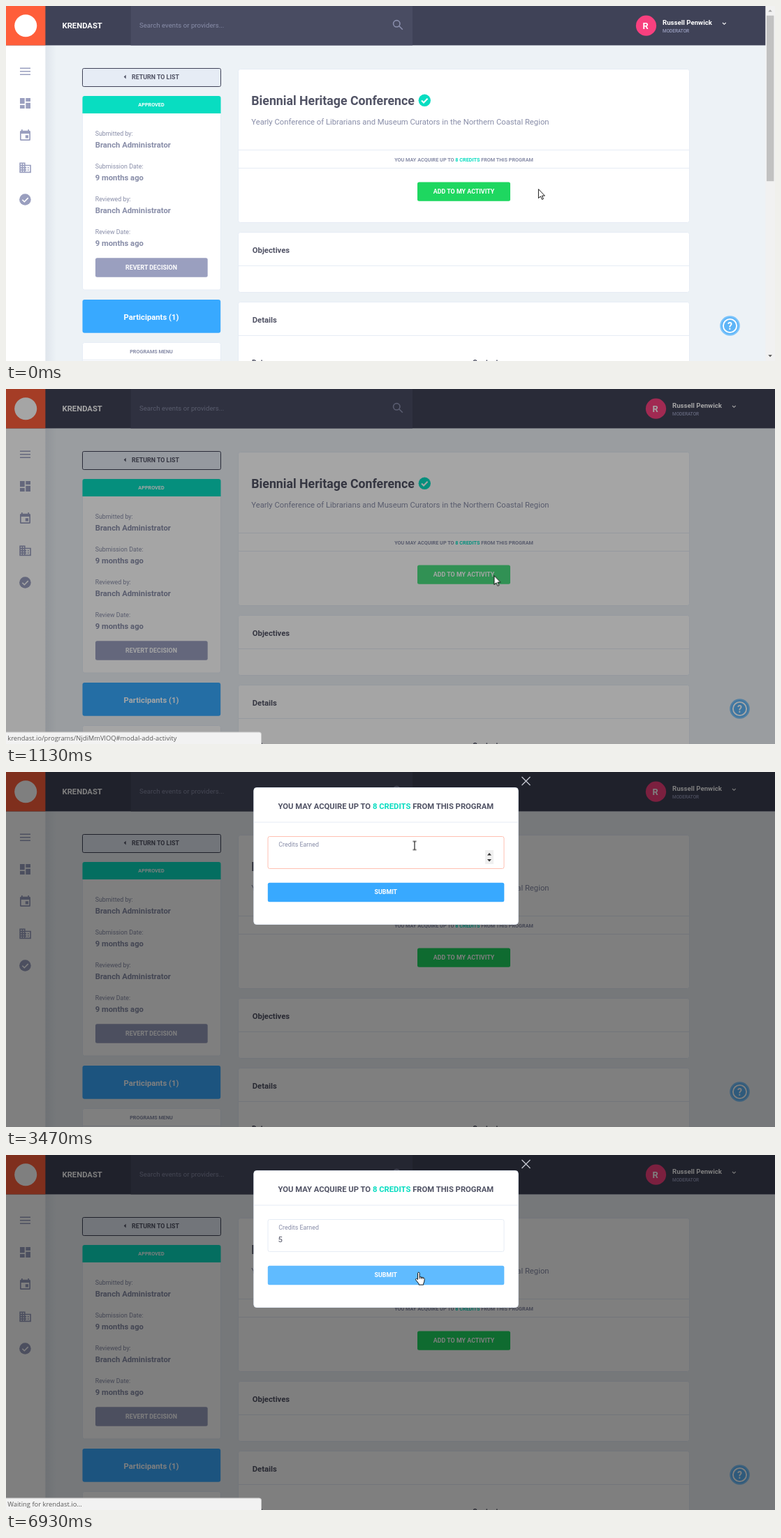
An HTML page for the animation above (8000 ms loop, 1101 by 509 pixels).

```html
<!DOCTYPE html>
<html lang="en">
<head>
<meta charset="utf-8">
<title>Add to my activity</title>
<style>
html, body { margin: 0; width: 100%; height: 100%; overflow: hidden; background: #edf2f6; }
svg { display: block; }
text { font-family: Roboto, Arial, sans-serif; font-size: 11.28px; fill: #888da8; }
.b { font-weight: 700; }
.m { font-size: 9.67px; }
.s { font-size: 8.87px; }
.xs { font-size: 7.25px; }
.mid { text-anchor: middle; }
.dark { fill: #515365; }
.white { fill: #fff; }
.teal { fill: #08ddc1; }
.card { fill: #fff; stroke: #e6ecf5; }
.rule { stroke: #e6ecf5; fill: none; }
.icon { fill: #9a9fbf; }
.line { stroke: #9a9fbf; fill: none; }
.tip text { font-family: "Open Sans", "Noto Sans", sans-serif; font-size: 9.4px; fill: #5a5a5a; }

/* one percent of the loop is 80 ms */
.anim { animation: 8s linear infinite; }
.step { animation: 8s step-end infinite; }
#bar { animation-name: bar; }
.edge { animation-name: edge; }
#add { animation-name: add; }
#shade { animation-name: shade; }
#modal { animation-name: slide, appear; animation-duration: 8s; animation-iteration-count: infinite; animation-timing-function: linear; }
#link { animation-name: link; }
#wait { animation-name: wait; }
#box { animation-name: box; }
#spin { animation-name: spin; }
#label { animation-name: label; }
#value { animation-name: value; }
#caret { animation-name: blink; }
#submit { animation-name: submit; }
#cursor { animation-name: move; }
#arrow { animation-name: arrow; }
#beam { animation-name: beam; }
#hand { animation-name: hand; }

@keyframes bar { 0% { opacity: 1 } 12.8125%, 100% { opacity: 0 } }
@keyframes edge { 0% { transform: translateX(0) } 12.8125%, 100% { transform: translateX(14px) } }
@keyframes add {
  0%, 4.125% { fill: #1ed760 } 7.875%, 14.6875% { fill: #4be082 }
  18.4375%, 100% { fill: #1ed760 }
}
@keyframes shade { 0%, 12.8125% { opacity: 0 } 14.6875%, 100% { opacity: .5 } }
@keyframes slide {
  0%, 14.6875% { transform: translateY(-49px); animation-timing-function: ease-out }
  18.4375%, 100% { transform: translateY(0) }
}
@keyframes appear { 0%, 14.6875% { opacity: 0 } 16.5625%, 100% { opacity: 1 } }
@keyframes link {
  0%, 4.625% { opacity: 0 } 5.5%, 16.25% { opacity: 1 } 19.125%, 100% { opacity: 0 }
}
@keyframes wait { 0% { opacity: 0 } 85.875%, 100% { opacity: 1 } }
@keyframes box {
  0%, 36.75% { stroke: #e6ecf5 } 39%, 85.875% { stroke: #ffc0b2 } 86.6%, 100% { stroke: #e6ecf5 }
}
@keyframes spin { 0% { opacity: 0 } 34.25% { opacity: 1 } 85.875%, 100% { opacity: 0 } }
@keyframes label {
  0%, 36.75% { transform: translate(390.3px, 117px); animation-timing-function: ease }
  40.5%, 100% { transform: translate(390.3px, 107.3px) scale(.786) }
}
@keyframes value { 0% { opacity: 0 } 54.125%, 100% { opacity: 1 } }
@keyframes blink {
  0% { opacity: 0; transform: translateX(0) }
  36.75% { opacity: 1; transform: translateX(0) }
  43.375% { opacity: 0; transform: translateX(0) }
  50% { opacity: 1; transform: translateX(0) }
  54.125% { opacity: 1; transform: translateX(7px) }
  60.875% { opacity: 0; transform: translateX(7px) }
  67.5% { opacity: 1; transform: translateX(7px) }
  74.125% { opacity: 0; transform: translateX(7px) }
  80.875% { opacity: 1; transform: translateX(7px) }
  85.875%, 100% { opacity: 0; transform: translateX(7px) }
}
@keyframes submit { 0%, 76.375% { fill: #38a9ff } 80.125%, 100% { fill: #60bbff } }
@keyframes move {
  0%, .875% { transform: translate(762px, 262px); animation-timing-function: ease-in-out }
  6.25%, 30.875% { transform: translate(698.5px, 267px); animation-timing-function: ease-in-out }
  35.875%, 71.625% { transform: translate(585px, 105.5px); animation-timing-function: ease-in-out }
  78%, 100% { transform: translate(591px, 168px) }
}
@keyframes arrow { 0% { opacity: 1 } 34.25% { opacity: 0 } 74.94% { opacity: 1 } 76.375%, 100% { opacity: 0 } }
@keyframes beam { 0% { opacity: 0 } 34.25% { opacity: 1 } 74.94%, 100% { opacity: 0 } }
@keyframes hand { 0% { opacity: 0 } 76.375%, 100% { opacity: 1 } }
</style>
</head>
<body>
<svg width="1101" height="509" viewBox="0 0 1101 509">
  <defs>
    <linearGradient id="fall"><stop stop-color="#5b6b8c" stop-opacity=".1"/><stop offset="1" stop-color="#5b6b8c" stop-opacity="0"/></linearGradient>
  </defs>
  <rect width="1101" height="509" fill="#edf2f6"/>

  <!-- side bar -->
  <rect x="56" y="56" width="16" height="453" fill="url(#fall)"/>
  <rect y="56" width="56.4" height="453" fill="#fff"/>
  <path class="line" stroke-width="1.5" d="M20 89.2h15M20 93.7h15M20 98.2h15"/>
  <path class="icon" d="M20 132h6.7v8.3H20zM28.3 132H35v5h-6.7zM20 142h6.7v5H20zM28.3 138.7H35v8.3h-6.7z"/>
  <path class="icon" fill-rule="evenodd" d="M22 177h1.7v1.7h7.6V177H33v1.7h.5q1.5 0 1.5 1.5v11.3q0 1.5-1.5 1.5h-12q-1.5 0-1.5-1.5v-11.3q0-1.5 1.5-1.5h.5zM21.7 183v8.3h11.6V183zM27.8 185.3h4.2v4.2h-4.2z"/>
  <path class="icon" fill-rule="evenodd" d="M19.3 224.5h8.3v3.2h8.3v11.5H19.3zM21 226.1v1.6h1.6v-1.6zm3.3 0v1.6h1.6v-1.6zM21 229.4v1.6h1.6v-1.6zm3.3 0v1.6h1.6v-1.6zM21 232.7v1.6h1.6v-1.6zm3.3 0v1.6h1.6v-1.6zM21 236v1.6h1.6V236zm3.3 0v1.6h1.6V236zM27.6 229.3v1.7h1.6v1.7h-1.6v1.6h1.6v1.7h-1.6v1.6h6.7v-8.3zm3.3 1.7h1.7v1.7h-1.7zm0 3.3h1.7v1.7h-1.7z"/>
  <circle class="icon" cx="27.4" cy="277.5" r="8.3"/>
  <path d="M23.4 277.8l2.9 2.9 5.4-5.6" fill="none" stroke="#fff" stroke-width="1.6"/>

  <!-- top bar -->
  <rect width="1101" height="56.4" fill="#3f4257"/>
  <rect x="178.7" width="403.3" height="56.4" fill="#494c62"/>
  <rect width="56.4" height="56.4" fill="#ff5e3a"/>
  <circle cx="28.2" cy="28.2" r="16" fill="#fff"/>
  <text class="b white" x="80.5" y="32">KRENDAST</text>
  <text class="m" x="191" y="31.4">Search events or providers...</text>
  <g class="line" stroke-width="1.6" stroke="#777b99" opacity=".8"><circle cx="559.3" cy="25.3" r="4.7"/><path d="M562.8 28.8l5 5"/></g>
  <g class="step edge">
    <circle cx="916.5" cy="28.2" r="14.6" fill="#f8407f"/>
    <text class="b white mid" x="915.5" y="32.8" style="font-size:12.9px">R</text>
    <text class="b m white" x="940" y="26.7">Russell Penwick</text>
    <text class="icon" x="940" y="38.2" style="font-size:6.45px;font-weight:500">MODERATOR</text>
    <path d="M1026 24l2.3 2.3 2.3-2.3" fill="none" stroke="#fff" stroke-width="1.1"/>
  </g>

  <!-- left column -->
  <rect x="109.5" y="89.5" width="198" height="26" rx="2" fill="#e6ecf5" stroke="#3f4257"/>
  <path class="dark" d="M171.7 98.8v5.6l-3-2.8z"/>
  <text class="b s dark" x="180" y="105.2">RETURN TO LIST</text>
  <rect class="card" x="109.5" y="129.5" width="198" height="277.5" rx="3"/>
  <path class="teal" d="M109.5 154v-22q0-3 3-3h192q3 0 3 3v22z"/>
  <text class="b xs white mid" x="208" y="144.4">APPROVED</text>
  <text class="s" x="127.7" y="186.4">Submitted by:</text>
  <text class="b" x="127.7" y="203.2">Branch Administrator</text>
  <text class="s" x="127.7" y="233.2">Submission Date:</text>
  <text class="b" x="127.7" y="250">9 months ago</text>
  <text class="s" x="127.7" y="280">Reviewed by:</text>
  <text class="b" x="127.7" y="297">Branch Administrator</text>
  <text class="s" x="127.7" y="326.8">Review Date:</text>
  <text class="b" x="127.7" y="343.8">9 months ago</text>
  <rect class="icon" x="128" y="361.3" width="160.7" height="27.5" rx="2.5"/>
  <text class="b s white mid" x="208" y="377.8">REVERT DECISION</text>
  <rect x="109.5" y="421" width="197.7" height="47.7" rx="3" fill="#38a9ff"/>
  <text class="b white mid" x="208" y="450.3">Participants (1)</text>
  <rect class="card" x="109.5" y="482.5" width="198" height="40" rx="3"/>
  <text class="b xs mid" x="208" y="497.8">PROGRAMS MENU</text>
  <path class="rule" d="M110 507.5h197"/>

  <!-- main column -->
  <rect class="card" x="332.5" y="90.5" width="646" height="220" rx="3"/>
  <text class="b dark" x="351.3" y="142.1" style="font-size:17.73px">Biennial Heritage Conference</text>
  <circle class="teal" cx="599.3" cy="135.3" r="8.7"/>
  <path d="M595 135.5l3 3 5.6-5.8" fill="none" stroke="#fff" stroke-width="2"/>
  <text x="351.3" y="170.4">Yearly Conference of Librarians and Museum Curators in the Northern Coastal Region</text>
  <path class="rule" d="M333 206.5h645M333 232.5h645"/>
  <text class="b xs mid" x="655.5" y="222.6">YOU MAY ACQUIRE UP TO <tspan class="teal">8 CREDITS</tspan> FROM THIS PROGRAM</text>
  <rect id="add" class="anim" x="589" y="252.5" width="133" height="27.3" rx="2.5" fill="#1ed760"/>
  <text class="b s white mid" x="655.5" y="269">ADD TO MY ACTIVITY</text>
  <rect class="card" x="332.5" y="324.5" width="646" height="86" rx="3"/>
  <text class="b dark" x="352.8" y="353.5">Objectives</text>
  <path class="rule" d="M333 372.5h645"/>
  <rect class="card" x="332.5" y="424.5" width="646" height="120" rx="3"/>
  <text class="b dark" x="352.8" y="453.5">Details</text>
  <path class="rule" d="M333 472.5h645"/>
  <g class="b"><text class="dark" x="352" y="515.3" style="font-size:10.48px">Date</text>
  <text class="dark" x="668" y="515.3" style="font-size:10.48px">Contact</text></g>

  <!-- help -->
  <g class="step edge">
    <circle cx="1036.5" cy="458.5" r="14.3" fill="#7cc4fb"/>
    <circle cx="1036.5" cy="458.5" r="12.2" fill="#5eb5f7"/>
    <circle cx="1036.5" cy="458.5" r="9.6" fill="none" stroke="#fff" stroke-width="1.9"/>
    <text class="b white mid" x="1036.5" y="463.6" style="font-size:14px">?</text>
  </g>

  <!-- scroll bar -->
  <g id="bar" class="step">
    <rect x="1087.3" width="13.7" height="509" fill="#f1f1f1"/>
    <rect x="1089" y="13.7" width="10.4" height="237.5" fill="#c1c1c1"/>
    <path d="M1091.3 8.3h5.6l-2.8-3z" fill="#a3a3a3"/>
    <path d="M1091.3 500.3h5.6l-2.8 3z" fill="#505050"/>
  </g>

  <rect id="shade" class="anim" width="1101" height="509" opacity="0"/>

  <!-- dialog -->
  <g id="modal" opacity="0">
    <path d="M738.5 7l12 12M750.5 7l-12 12" stroke="#c4c6d0" stroke-width="1.3"/>
    <rect x="354.8" y="22.5" width="378.5" height="196" rx="4" fill="#fff" stroke="#e6ecf5"/>
    <text class="b dark mid" x="543.8" y="53.2">YOU MAY ACQUIRE UP TO <tspan class="teal">8 CREDITS</tspan> FROM THIS PROGRAM</text>
    <path class="rule" d="M355.3 72h377.5"/>
    <rect id="box" class="anim" x="375" y="92.5" width="338" height="46" rx="2.5" fill="#fff" stroke="#e6ecf5"/>
    <text id="label" class="anim">Credits Earned</text>
    <text id="value" class="step dark" x="389.6" y="125.2">5</text>
    <rect id="caret" class="step" x="389" y="115" width="1" height="14" fill="#333"/>
    <g id="spin" class="step">
      <rect x="686" y="112" width="12" height="20" fill="#f0f0f0"/>
      <path d="M689 119.5h6l-3-3.4zM689 125h6l-3 3.4z" fill="#333"/>
    </g>
    <rect id="submit" class="anim" x="374.8" y="158.7" width="338.5" height="27.5" rx="2.5" fill="#38a9ff"/>
    <text class="b s white mid" x="543.8" y="175.3">SUBMIT</text>
  </g>

  <!-- browser status -->
  <g id="link" class="anim tip" opacity="0">
    <path d="M-1 510v-18h363.5q3 0 3 3v15z" fill="#f2f2f2" stroke="#c8c8c8"/>
    <text x="2.3" y="504">krendast.io/programs/NjdiMmVlOQ#modal-add-activity</text>
  </g>
  <g id="wait" class="step tip" opacity="0">
    <path d="M-1 510v-18h363.5q3 0 3 3v15z" fill="#f2f2f2" stroke="#c8c8c8"/>
    <text x="2.3" y="504">Waiting for krendast.io...</text>
  </g>

  <g id="cursor" class="anim">
    <path id="arrow" class="step" d="M.4.6v13l3-2.8 2.1 4.6 1.9-.9-2-4.4h4z" fill="#fff" stroke="#000" stroke-width=".9"/>
    <path id="beam" class="step" d="M-2.6-6h2.1l.5.5.5-.5h2.1M0-5.5v11M-2.6 6h2.1l.5-.5.5.5h2.1" fill="none" stroke="#111" stroke-width="1.1"/>
    <path id="hand" class="step" d="M-1.5 1.4c0-1.6 2.6-1.6 2.6 0v5.2l5.3 1.2c1.3.4 1.9 1.2 1.8 2.5l-.5 3.6c-.2 1-.7 1.6-1 2.2v2H0v-1.6l-4.3-5.4c-.7-1.1.6-2.4 1.8-1.4l1 .9zM1.1 6.6v3M3.5 7.2v2.6M5.9 7.8v2.2" fill="#fff" stroke="#000" stroke-width=".9" stroke-linejoin="round"/>
  </g>
</svg>
</body>
</html>
```
